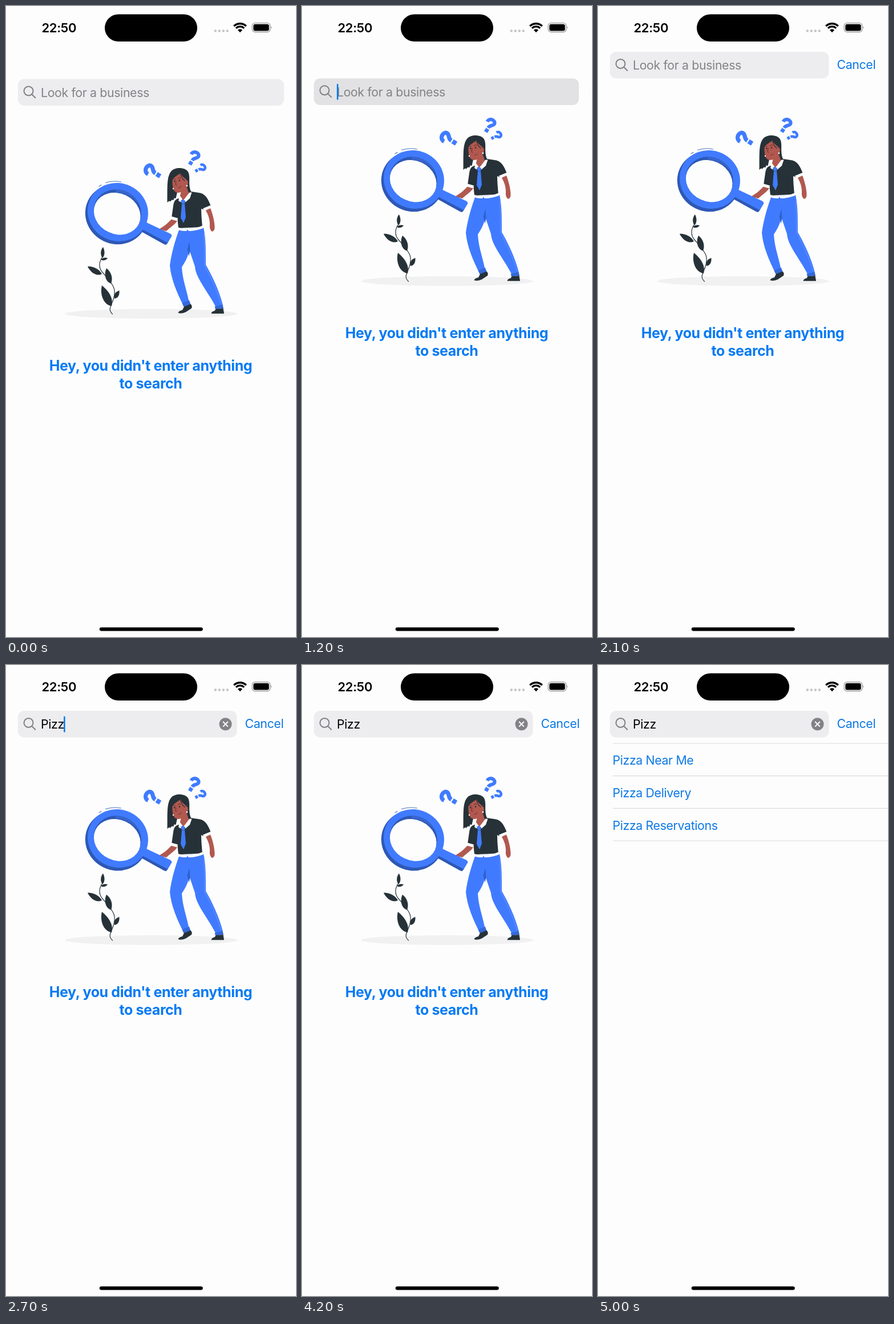
An HTML page for the animation above (5100 ms loop, 508 by 1102 pixels).

```html
<!DOCTYPE html>
<html lang="en">
<head>
<meta charset="utf-8">
<title>Business search</title>
<style>
  html, body { margin: 0; width: 100%; height: 100%; overflow: hidden; background: #fdfdfd; }
  svg { display: block; width: 100%; height: 100%; }
  text { font: 400 21.3px Inter, Roboto, sans-serif; letter-spacing: -.36px; white-space: pre; }
  .clock { font-size: 22px; font-weight: 600; letter-spacing: -.35px; text-anchor: middle; }
  .title { font-size: 25px; font-weight: 700; letter-spacing: -.4px; text-anchor: middle; fill: #047af4; }
  .link { fill: #0b78e6; }
  .ink { fill: #263238; }
  .blue { fill: #407bff; }
  .deep { fill: #2d58b5; }
  .skin { fill: #b1584f; }
  .white { fill: #fdfdfd; }
  .line { fill: none; stroke-linecap: round; }
  .flat { stroke-linecap: butt; }
</style>
</head>
<body>
<svg viewBox="0 0 508 1102">
  <defs>
    <g id="ask">
      <path class="line flat" d="M-7.500-2.500C-8.500-13 8-14 7.500-5C7 0 .5 0 .5 7.500" stroke="#407bff" stroke-width="7.200"/>
      <rect class="blue" x="-3.500" y="10" width="8" height="7.500"/>
    </g>
  </defs>
  <rect width="508" height="1102" fill="#fdfdfd"/>

  <g id="status">
    <text class="clock" x="92.800" y="46">22:50</text>
    <rect x="173" y="14.500" width="162" height="47.500" rx="23.750"/>
    <path class="line" d="M366.800 43.500H389" stroke="#c5c5c8" stroke-width="4.400" stroke-dasharray="0 7"/>
    <g class="line flat" stroke="#000" stroke-width="3.300">
      <path d="M399.200 35.200A15.300 15.300 0 0 1 420.800 35.200"/>
      <path d="M402.900 38.900A10 10 0 0 1 417.100 38.900"/>
    </g>
    <path d="M406 42A5.700 5.700 0 0 1 414 42L410 46.300Z"/>
    <rect x="431.200" y="29.700" width="31.600" height="15.800" rx="5" fill="none" stroke="#9b9b9d" stroke-width="1.300"/>
    <rect x="433.300" y="31.800" width="27.400" height="11.600" rx="3.200"/>
    <path d="M464.300 35Q466.500 37.600 464.300 40.300Z" fill="#9b9b9d"/>
  </g>
  <rect x="163.800" y="1085.200" width="181" height="6.300" rx="3.150"/>

  <g id="empty">
    <ellipse cx="254.500" cy="480.500" rx="151" ry="8.500" fill="#f1f1f2"/>

    <g class="ink">
      <path class="line" d="M186.500 481C180 475 182 470 185 463C190 452 192 441 188 433C183 423 173 413 168 407C162 399 163 389 169 381" stroke="#263238" stroke-width="1.200"/>
      <path d="M170 364C165 370 165 378 169 383C174 378 173 370 170 364Z"/>
      <path d="M166 385.500C170 382 174 382 178 383C175 388 169 388.500 166 385.500Z"/>
      <path d="M143 398C151 397 163 402 168 411C158 416 148 408 143 398Z"/>
      <path d="M176 401C171 411 174 425 184 427.500C188 418 184 407 176 401Z"/>
      <path d="M168 431C164 447 171 465 185 467C189 453 179 440 168 431Z"/>
      <path d="M198.500 440C191 442 188 448 190 454C197 453 199 447 198.500 440Z"/>
    </g>

    <use href="#ask" transform="translate(255 231.600) rotate(-58)"/>
    <use href="#ask" transform="translate(329 207) rotate(30) scale(.85)"/>
    <use href="#ask" transform="translate(341.500 226) rotate(62) scale(.65)"/>

    <g id="arms" class="skin">
      <path d="M290 315L300 318C297 324 287 330 281 336L267 333C274 330 283 323 290 315Z"/>
      <path d="M349.500 299L358 296C362 306 365 318 365.500 328Q366 336 361 337Q356 334 357 324C357 313 353 306 349.500 299Z"/>
    </g>

    <g id="lens">
      <ellipse class="deep" rx="55" ry="52" transform="translate(193.300 306.700) rotate(25)"/>
      <path class="deep" d="M243 326L284 356L280.500 360Q278 360 275 358L237 337Z"/>
      <path class="blue" d="M244 320L287.500 340.500Q291.500 342.500 290 345.500L283.500 356.500L239 333Z"/>
      <ellipse class="blue" rx="53.500" ry="50.500" transform="translate(196 303) rotate(25)"/>
      <ellipse class="deep" rx="42.300" ry="38.500" transform="translate(195.300 302.500) rotate(25)"/>
      <path d="M190 263.500C210 262 228 274 235 292L227 283C219 274 206 269 194 269Z" fill="#3765cd"/>
      <ellipse class="white" rx="41.900" ry="35.500" transform="translate(194.700 305.700) rotate(25)"/>
      <path class="line" d="M163 258L167 255.500M174.500 251.500C183 248.500 193 248.500 201.500 250" stroke="#4d76c4" stroke-width="1.100"/>
    </g>

    <g id="legs">
      <path class="blue" d="M303.500 333L346 330C350 348 350 368 350 395C361 414 374 441 380 466L367.500 469C356 445 332 418 331 398L321.500 370C317 385 313 391 308 399C309 421 317 440 320.500 460L311 467C300 445 289 420 287 396C290 374 296 353 303.500 333Z"/>
      <path d="M321.500 354L317.500 368C319 373 320 377 320.500 380L322.500 371Z" fill="#2f62cc"/>
      <path class="line" d="M346.500 340C348 358 348 378 348 396C358 415 371 441 377 464" stroke="#719bff" stroke-width=".8"/>
      <path d="M308.500 462L321 457L323.500 464.500L311.500 468.500ZM365.500 468L379.500 464.500L381 471L367 472.500Z" fill="#3568d8"/>
      <path class="ink" d="M312 468L323.500 463.500Q327 467 325 471L315 477.500Q307 481 301.500 479Q302 475.500 309 474ZM367 472.300L380.500 471L382 480.300H359.500Q360 476.500 366 475Z"/>
    </g>

    <g id="body">
      <path class="ink" d="M303 279C296 280 294 285 293 292L290 313L300.500 316L302 331L344 329C343 318 342 308 342 297L347 299L358.500 291.500C354 280 349 270 337 269L324 267L311 285Z"/>
      <path class="skin" d="M308 262L304.500 276L309 285L323 270L318 254Z"/>
      <path class="white" d="M304.500 274L302 283L306 285.500L309.500 281ZM321.500 268.500L325.500 268.500L322 279L314.500 285.500L311 282ZM290 310.500L301 313.500L300 318.500L289 315.500ZM345 296.500L358.500 291L360.500 295L347.500 301ZM301 329.500Q310 333 319.500 332Q333 331.500 344.500 326.500L345.500 331Q332 336 320 336L318 333.500L316 336Q308 336.500 302 334Z"/>
      <path class="blue" d="M306 283L309 280.500L314 283L313 288L315 312L311 322L306 313L308 288.500Z"/>
      <path class="line" d="M308.200 288.500H313" stroke="#2d58b5"/>
    </g>

    <g id="head">
      <path class="ink" d="M282.500 286C283 262 281 242 289 232C296 224 313 224 319 232.500C324 242 318 255 324.500 268L320 269L316 257L300 268L297.500 279L294.500 278.500L293.500 282L290.500 281.500L288 284.500L286 283.500Z"/>
      <path class="skin" d="M291.500 247C295 241 301 238 306 235C308 241 313 243 316.500 247Q320 249 318.500 254Q317 258 315 258C314 264 308 269.500 301 269C294 268 291 262 291.500 247Z"/>
      <path class="line" d="M306 236Q307 244 313 248" stroke="#263238" stroke-width="1.300"/>
      <path class="line" d="M294 246.500L297 245M301.500 243.500L305.500 243M302.500 260.500Q306 260.500 307.500 258M298 249L297 255L299 256" stroke="#642e2d"/>
      <g class="ink"><circle cx="295.500" cy="249" r="1.200"/><circle cx="304" cy="247.500" r="1.300"/></g>
      <g class="white"><circle cx="317" cy="257" r="1.400"/><circle cx="293" cy="262" r="1.200"/></g>
    </g>

    <text class="title" x="253.500" y="579.500">Hey, you didn't enter anything</text>
    <text class="title" x="253.500" y="610.500">to search</text>
  </g>

  <g id="results"></g>

  <g id="bar">
    <rect id="field" x="20.800" width="466.200" height="46.500" rx="11"/>
    <g class="line" stroke="#7f7f84" stroke-width="2">
      <circle cx="39.500" cy="20.900" r="8"/>
      <path d="M45.300 26.700L51.300 32.700"/>
    </g>
    <text id="hint" x="61" y="31.300" fill="#838387">Look for a business</text>
    <text id="query" x="61" y="31.300"></text>
    <g id="clear" transform="translate(384.500 23.300)">
      <circle r="11" fill="#828287"/>
      <path class="line" d="M-3.800-3.800L3.800 3.800M-3.800 3.800L3.800-3.800" stroke="#fff" stroke-width="1.900"/>
    </g>
    <rect id="caret" y="9.500" width="2.600" height="28" rx="1.300" fill="#0a7af0"/>
    <text id="cancel" class="link" y="30.300">Cancel</text>
  </g>
</svg>
<script>
const $ = id => document.getElementById(id);
const LOOP = 5100, WORD = "Pizz", KEYS = [2200, 2400, 2550, 2700];
const clamp = v => Math.max(0, Math.min(1, v));
const ramp = (t, from, to) => clamp((t - from) / (to - from));
const smooth = u => u * u * (3 - 2 * u);
const mix = (a, b, u) => a + (b - a) * u;
const show = (id, on) => $(id).setAttribute("display", on ? "inline" : "none");

// Caret spans: fade-in start, fade-out start, fade-out end
const BLINKS = [[1100, 1750, 1860], [2110, 3170, 3300], [3600, 4070, 4200], [4600, 4830, 4880]];

$("results").innerHTML = ["Near Me", "Delivery", "Reservations"].map((name, i) =>
  `<text class="link" x="25.500" y="${173.7 + i * 57}">Pizza ${name}</text>`).join("") +
  [137, 193.700, 250.400, 307].map(y => `<path d="M26 ${y}H508" stroke="#dcdcde" stroke-width="1.200"/>`).join("");

function caretAlpha(t) {
  return Math.max(...BLINKS.map(([on, off, end]) => ramp(t, on, on + 80) * (1 - ramp(t, off, end))));
}

function draw(t) {
  const open = smooth(ramp(t, 1175, 1460));
  const press = smooth(ramp(t, 880, 1080)) * (1 - smooth(ramp(t, 1210, 1480)));
  const typed = WORD.slice(0, KEYS.filter(k => t >= k).length);
  const done = t >= 5000;

  show("empty", !done);
  show("results", done);
  $("empty").setAttribute("transform", `translate(0 ${t < 1100 ? 57 : 0})`);

  $("bar").setAttribute("transform", `translate(0 ${mix(127.5, 80, open)})`);
  $("field").setAttribute("width", mix(466.2, 383.7, open));
  const tone = mix(237, 226, press);
  $("field").setAttribute("fill", `rgb(${tone},${tone},${tone + 2})`);

  show("cancel", open > 0);
  $("cancel").setAttribute("x", mix(503, 418.5, open));
  $("cancel").setAttribute("opacity", open);

  show("hint", !typed);
  show("clear", typed);
  $("query").textContent = typed;
  const width = typed ? $("query").getComputedTextLength() : 0;
  $("caret").setAttribute("x", 61 + width - (typed ? .8 : 0));
  $("caret").setAttribute("opacity", caretAlpha(t));
}

const start = performance.now();
function tick() {
  draw((performance.now() - start) % LOOP);
  requestAnimationFrame(tick);
}
tick();
</script>
</body>
</html>
```
